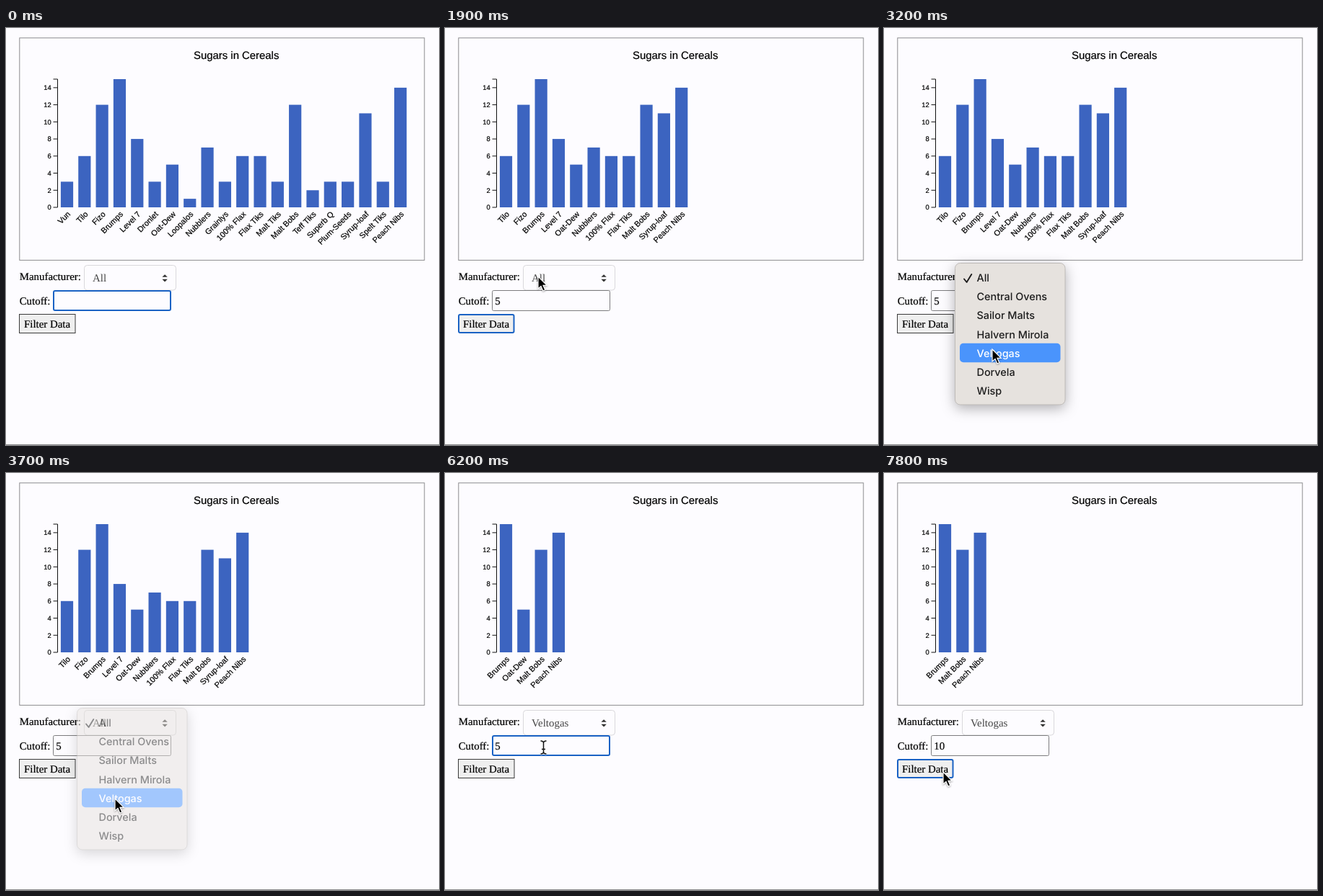
Recreate the animation shown at these times as an HTML page. Size 600 by 579 pixels, loop 8 s.

```html
<!DOCTYPE html>
<html lang="en">
<head>
<meta charset="utf-8">
<title>Sugars in Cereals</title>
<style>
  html, body { margin: 0; width: 100%; height: 100%; overflow: hidden; background: #fdfcff; }
  svg { display: block; width: 100%; height: 100%; }
  text {
    font: 14.9px "Liberation Serif", "Times New Roman", serif;
    white-space: pre; text-rendering: geometricPrecision;
    stroke: currentColor; stroke-width: .2px;
  }
  .title { font: 14.9px "Liberation Sans", Arial, sans-serif; }
  .tick { font: 9.4px "Liberation Sans", Arial, sans-serif; }
  .name { font: 11px "Liberation Sans", Arial, sans-serif; }
  .item { font: 500 14.4px Inter, sans-serif; fill: #1c1c1c; stroke: none; }
  .value { fill: #444; stroke: none; }
  .shadow { filter: drop-shadow(0 5px 9px rgba(0, 0, 0, .3)); }
</style>
</head>
<body>
<svg id="stage" viewBox="0 0 600 579"></svg>
<script>
const LOOP = 8000, STEP = 100;
const FOCUS = '#1a62c4';
const BASE = 249, UNIT = 178 / 15, PITCH = 24.32;
const MENU_TOP = 333, ROW = 26.2;
const BRAND = 'Veltogas';
const makers = ['All', 'Central Ovens', 'Sailor Malts', 'Halvern Mirola', BRAND, 'Dorvela', 'Wisp'];

// name, sugar, made by BRAND
const cereals = [
  ['Vun', 3], ['Tilo', 6], ['Fizo', 12], ['Brumps', 15, true], ['Level 7', 8],
  ['Dronlet', 3], ['Oat-Dew', 5, true], ['Loopalos', 1], ['Nubblers', 7], ['Grainlys', 3],
  ['100% Flax', 6], ['Flax Tiks', 6], ['Malt Tiks', 3], ['Malt Bobs', 12, true], ['Teff Tiks', 2],
  ['Superb Q', 3], ['Plum-Seeds', 3], ['Syrup-loaf', 11], ['Spelt Tiks', 3], ['Peach Nibs', 14, true]
];

// Each row holds from its time until the next one.
const states = [
  { at: 0, view: 0, maker: 'All', cutoff: '', focus: 'input' },
  { at: 300, cutoff: '5' },
  { at: 1000, view: 1, focus: 'button' },
  { at: 2100, menu: 1, focus: '' },
  { at: 3700, menu: 0.5 },
  { at: 3800, menu: 0, view: 2, maker: BRAND, focus: 'select' },
  { at: 5400, focus: 'input' },
  { at: 6400, cutoff: '' },
  { at: 6500, cutoff: '1' },
  { at: 6700, cutoff: '10' },
  { at: 7600, view: 3, focus: 'button' }
];

// time, x, y of the pointer tip
const path = [
  [500, 137, 381], [900, 67, 404], [1400, 67, 404], [1900, 129, 345], [2600, 129, 345],
  [3200, 150, 446], [3400, 151, 452], [4900, 151, 452], [5300, 136.5, 381],
  [7000, 136.5, 381], [7500, 82, 415]
];
const hidden = [[0, 500], [6300, 7000]];

const stage = document.getElementById('stage');

function add(parent, tag, attrs = {}, text) {
  const el = document.createElementNS('http://www.w3.org/2000/svg', tag);
  for (const key in attrs) el.setAttribute(key, attrs[key]);
  if (text !== undefined) el.textContent = text;
  parent.append(el);
  return el;
}
const box = (parent, x, y, width, height, attrs) =>
  add(parent, 'rect', { x, y, width, height, fill: 'none', ...attrs });
const label = (parent, x, y, text, attrs) => add(parent, 'text', { x, y, ...attrs }, text);
const show = (el, on) => { el.style.display = on ? '' : 'none'; };

function drawAxis() {
  add(stage, 'path', { d: 'M65.5 71H71.5V249H65.5', fill: 'none', stroke: '#111' });
  for (let v = 0; v <= 14; v += 2) {
    const y = BASE - v * UNIT;
    if (v) add(stage, 'path', { d: `M65.5 ${y}H71.5`, stroke: '#111' });
    label(stage, 62.8, y + 3.3, v, { class: 'tick', 'text-anchor': 'end' });
  }
}

function drawView(rows) {
  const group = add(stage, 'g');
  rows.forEach(([name, sugar], i) => {
    const x = 75.9 + i * PITCH, height = sugar * UNIT;
    box(group, x, BASE - height, 17.2, height, { fill: '#3c64c0' });
    label(group, 0, 0, name, {
      class: 'name', 'text-anchor': 'end', transform: `translate(${x + 14} 259.2) rotate(-45)`
    });
  });
  return group;
}

function drawMenu() {
  const group = add(stage, 'g');
  box(group, 98.5, 326.5, 152.5, 196.5, { rx: 7, fill: '#e6e2de', stroke: '#bebab7', class: 'shadow' });
  const bar = box(group, 105, MENU_TOP, 139.5, 26.5, { rx: 5, fill: '#4a94fc' });
  const check = add(group, 'path', {
    d: 'M111 348.5L114.6 353L121.3 342', fill: 'none', 'stroke-width': 1.9,
    'stroke-linecap': 'round', 'stroke-linejoin': 'round'
  });
  const items = makers.map((name, i) => label(group, 128.5, 352 + i * ROW, name, { class: 'item' }));
  return { group, bar, check, items };
}

// A bordered control; the border is drawn inside the given outer edges.
function control(x, y, width, height, fill = 'none') {
  const el = add(stage, 'rect', { fill });
  return (stroke, line, rx) => {
    const attrs = {
      x: x + line / 2, y: y + line / 2, width: width - line, height: height - line,
      stroke, 'stroke-width': line, rx
    };
    for (const key in attrs) el.setAttribute(key, attrs[key]);
  };
}

box(stage, 18.8, 13.8, 561, 308.6, { stroke: '#8c8c8e' });
add(stage, 'path', { d: 'M0 578.5H600', stroke: '#8c8c8e' });
label(stage, 319.2, 43.2, 'Sugars in Cereals', { class: 'title', 'text-anchor': 'middle' });
drawAxis();
const views = [
  cereals,
  cereals.filter(c => c[1] >= 5),
  cereals.filter(c => c[2] && c[1] >= 5),
  cereals.filter(c => c[2] && c[1] >= 10)
].map(drawView);

label(stage, 18.7, 350.3, 'Manufacturer:');
const paintSelect = control(108, 329, 128, 35.5);
const maker = label(stage, 120, 352.3, '', { class: 'value' });
add(stage, 'path', { d: 'M216.4 345.8L220.1 342.2L223.8 345.8ZM216.4 348.8L220.1 352.4L223.8 348.8Z', fill: '#333' });
label(stage, 18.7, 384.3, 'Cutoff:');
const paintInput = control(65, 364, 164, 29);
const cutoff = label(stage, 69.3, 384.3, '');
const paintButton = control(18, 397, 78.5, 27, '#efefef');
label(stage, 25, 416.2, 'Filter Data');
const menu = drawMenu();

const arrow = add(stage, 'path', {
  d: 'M0 0V17L4 13.4L6.8 20L9.8 18.7L7 12.3H12.2Z', fill: '#000', stroke: '#fff',
  'stroke-width': 1.2, style: 'filter:drop-shadow(0 1px 1px rgba(0,0,0,.35))'
});
const beam = add(stage, 'g', { fill: 'none' });
for (const [stroke, width] of [['#fff', 3], ['#111', 1.5]]) {
  add(beam, 'path', {
    d: 'M-4 -9Q0 -9 0 -6V6Q0 9 -4 9M4 -9Q0 -9 0 -6V6Q0 9 4 9M-2.5 2.5H2.5',
    stroke, 'stroke-width': width
  });
}

function pointerAt(t) {
  const next = path.findIndex(p => p[0] > t);
  if (next === 0) return path[0].slice(1);
  if (next < 0) return path[path.length - 1].slice(1);
  const [t0, x0, y0] = path[next - 1], [t1, x1, y1] = path[next];
  const u = (t - t0) / (t1 - t0), k = u * u * (3 - 2 * u);
  return [x0 + (x1 - x0) * k, y0 + (y1 - y0) * k];
}

function render(t) {
  const s = Object.assign({ menu: 0 }, ...states.filter(row => row.at <= t));
  const [x, y] = pointerAt(t);

  views.forEach((view, i) => show(view, i === s.view));
  maker.textContent = s.maker;
  cutoff.textContent = s.cutoff;
  paintSelect(s.focus === 'select' ? '#b4b4b6' : '#d9d8db', 1, 4);
  if (s.focus === 'input') paintInput(FOCUS, 2, 2);
  else paintInput('#7c7c7e', 1, 2);
  if (s.focus === 'button') paintButton(FOCUS, 2, 2);
  else paintButton('#3a3a3a', 1, 0);

  show(menu.group, s.menu > 0);
  menu.group.style.opacity = s.menu;
  const row = Math.floor((y - MENU_TOP) / ROW);
  menu.bar.setAttribute('y', MENU_TOP + row * ROW);
  menu.items.forEach((item, i) => { item.style.fill = i === row ? '#fff' : ''; });
  menu.check.setAttribute('stroke', row === 0 ? '#fff' : '#1c1c1c');

  const visible = !hidden.some(([from, to]) => t >= from && t < to);
  const overInput = !s.menu && x > 65 && x < 229 && y > 364 && y < 393;
  show(arrow, visible && !overInput);
  show(beam, visible && overInput);
  for (const el of [arrow, beam]) el.setAttribute('transform', `translate(${x} ${y})`);
}

const start = performance.now();
function tick() {
  const t = (performance.now() - start) % LOOP;
  render(Math.floor(t / STEP) * STEP);
  requestAnimationFrame(tick);
}
tick();
</script>
</body>
</html>
```
